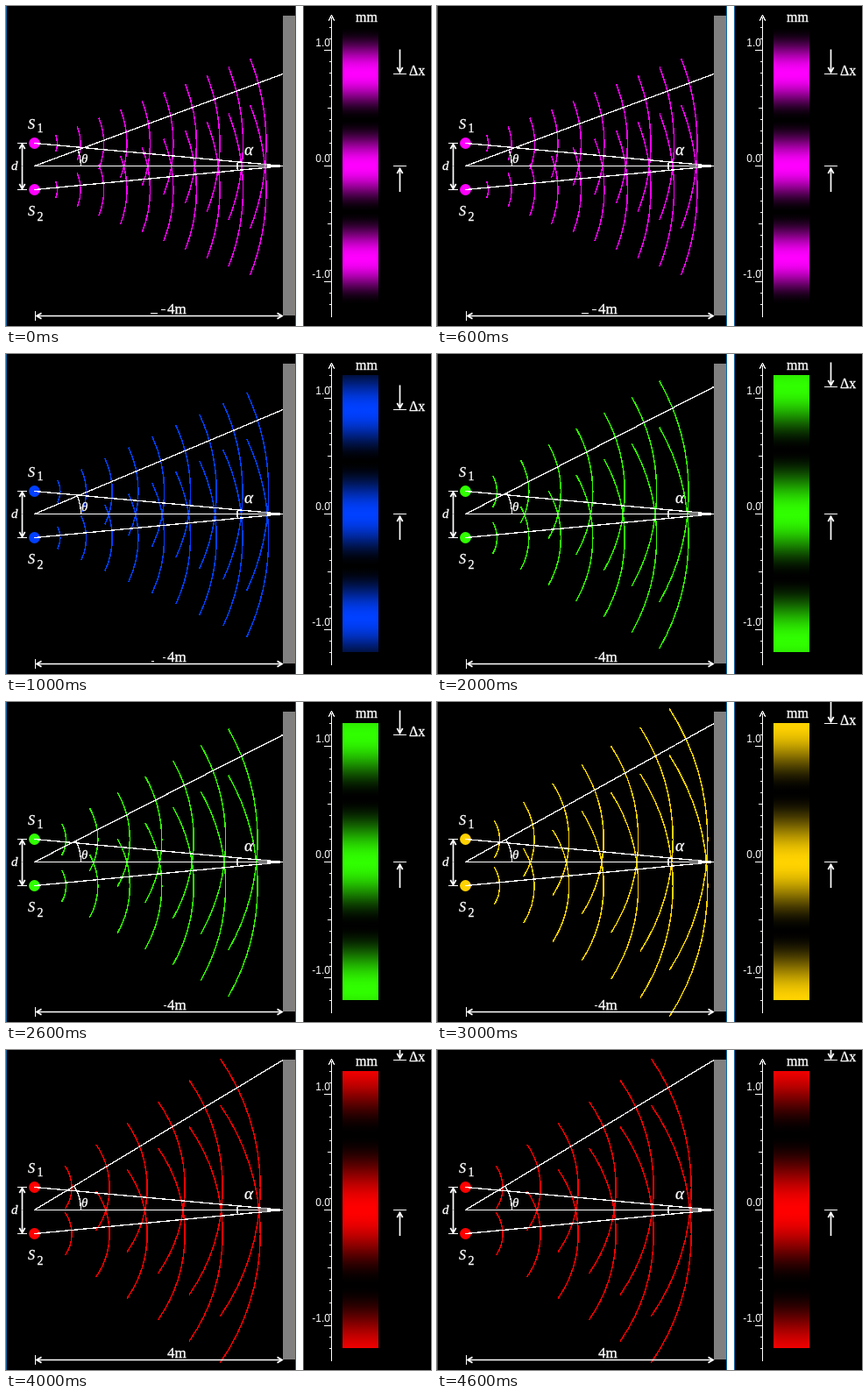
Recreate the animation shown at these times as an HTML page. Size 485x365 px, loop 5000 ms.

```html
<!DOCTYPE html>
<html lang="en">
<head>
<meta charset="utf-8">
<title>Two-slit interference by colour</title>
<style>
  html, body { margin: 0; width: 100%; height: 100%; overflow: hidden; background: #000; }
  svg { display: block; width: 485px; height: 365px; }
  line, path { fill: none; stroke: #fff; stroke-width: 1.35; shape-rendering: crispEdges; }
  text { fill: #fff; stroke: #fff; stroke-width: .3; font: 16px "Liberation Serif", "Noto Serif", serif; }
  .it { font-style: italic; }
  .num { font: 12px "Liberation Sans", Inter, sans-serif; text-anchor: end; stroke: none; }
  .frame line { stroke: #0b6aa8; stroke-width: 1; }
  .waves path { stroke: var(--hue); stroke-width: 1.5; }
  .dot { fill: var(--hue); }
  .arrow line, .arrow path { stroke-width: 1.7; shape-rendering: auto; }
  .scene { visibility: hidden; animation: show 5s step-end infinite; }
  @keyframes show {
    0% { visibility: visible; }
    20%, 100% { visibility: hidden; }
  }
</style>
</head>
<body>
<svg viewBox="0 0 485 365">
  <defs id="defs"></defs>
  <rect width="485" height="365" fill="#000"/>
  <g class="frame">
    <rect x="331" width="8" height="365" fill="#fff"/>
    <line x1="0.5" y1="0" x2="0.5" y2="365"/>
    <line x1="330.5" y1="0" x2="330.5" y2="365"/>
    <line x1="339.5" y1="0" x2="339.5" y2="365"/>
  </g>
  <g id="scenes"></g>
  <g id="fixed">
    <rect x="316" y="11" width="14" height="342" fill="#808080"/>
    <text class="it" x="25" y="140">S<tspan x="35.5" y="143.5" font-size="14" font-style="normal">1</tspan></text>
    <text class="it" x="25" y="239">S<tspan x="35.5" y="245" font-size="14" font-style="normal">2</tspan></text>
    <text class="it" x="6" y="187" style="font-size:15px">d</text>
    <text class="it" x="86" y="179" style="font-size:15px">θ</text>
    <text class="it" x="272" y="170" style="font-size:19px">α</text>
    <text x="184" y="351" style="font-size:17px">4m</text>
    <text x="399" y="18">mm</text>
  </g>
</svg>
<script>
const NS = "http://www.w3.org/2000/svg";
const byId = id => document.getElementById(id);
const MID = 182.5, LEFT = 32.5, WALL = 316, SLITS = [156.5, 209.5];
const BAND = { x: 384, top: 24, height: 316 };

function add(parent, tag, attrs = {}, text = "") {
  const el = document.createElementNS(NS, tag);
  for (const key in attrs) el.setAttribute(key, attrs[key]);
  el.textContent = text;
  parent.append(el);
  return el;
}

const line = (g, x1, y1, x2, y2) => add(g, "line", { x1, y1, x2, y2 });

// Open arrowhead with its tip at x, y, pointing along angle (degrees).
const head = (g, x, y, angle, size = 5.5) => add(g, "path", {
  d: `M${-size} -3.2L0 0L${-size} 3.2`,
  transform: `translate(${x} ${y}) rotate(${angle})`
});

function arrow(parent, x1, y1, x2, y2) {
  const g = add(parent, "g", { class: "arrow" });
  line(g, x1, y1, x2, y2);
  head(g, x2, y2, Math.atan2(y2 - y1, x2 - x1) * 180 / Math.PI);
}

function arc(g, cx, cy, r, from, to) {
  const at = a => `${cx + r * Math.cos(a)} ${cy + r * Math.sin(a)}`;
  return add(g, "path", { d: `M${at(from)}A${r} ${r} 0 0 1 ${at(to)}` });
}

// spread: half angle of the wave arcs; shift: fringe spacing in pixels.
const colours = [
  { hue: "#ff00ff", rgb: [255, 0, 255], step: 26.5, count: 10, spread: 21.5, shift: 105.5, dashes: [[165, 173, 350], [177, 182, 346]] },
  { hue: "#0040ff", rgb: [0, 64, 255], step: 29.75, count: 9, spread: 25, shift: 118.8, dashes: [[166, 169, 350], [179, 182, 346]] },
  { hue: "#30ff00", rgb: [48, 255, 0], step: 36.45, count: 7, spread: 29.6, shift: 145, dashes: [[180, 183, 346]] },
  { hue: "#ffd200", rgb: [255, 210, 0], step: 39.55, count: 7, spread: 32.6, shift: 158.5, dashes: [[180, 183, 346]] },
  { hue: "#ff0000", rgb: [255, 0, 0], step: 43.05, count: 6, spread: 34.7, shift: 171.5, dashes: [] }
];

function fringes(g, c, id) {
  const grad = add(byId("defs"), "linearGradient", {
    id, gradientUnits: "userSpaceOnUse",
    x1: 0, x2: 0, y1: BAND.top, y2: BAND.top + BAND.height
  });
  const n = 79;
  for (let k = 0; k <= n; k++) {
    const y = BAND.top + BAND.height * k / n;
    const level = Math.cos(Math.PI * (y - MID) / c.shift) ** 2;
    add(grad, "stop", {
      offset: k / n,
      "stop-color": `rgb(${c.rgb.map(v => Math.round(v * level))})`
    });
  }
  add(g, "rect", { x: BAND.x, y: BAND.top, width: 41, height: BAND.height, fill: `url(#${id})` });
}

function scene(c, i) {
  const g = add(byId("scenes"), "g", {
    class: "scene", style: `--hue:${c.hue};animation-delay:${i - 5}s`
  });
  const waves = add(g, "g", { class: "waves" });
  const half = c.spread * Math.PI / 180;
  for (const y of SLITS) {
    for (let k = 1; k <= c.count; k++) arc(waves, LEFT - 0.5, y + 0.3, c.step * k, -half, half);
    add(g, "circle", { class: "dot", cx: LEFT, cy: y, r: 6.4 });
  }

  const top = Math.floor(MID - c.shift) + 0.5;
  line(g, LEFT, MID, WALL, top);
  arc(g, LEFT, MID, 53, -Math.atan2(c.shift, WALL - LEFT), 0);

  fringes(g, c, `band${i}`);
  line(g, 442, top, 457, top);
  arrow(g, 449.5, top - 28, 449.5, top - 2);
  add(g, "text", { x: 460, y: top + 1.5 }, "Δx");
  for (const [a, b, y] of c.dashes) line(g, a, y + 0.5, b, y + 0.5);
}

function fixedParts(g) {
  line(g, LEFT, MID, WALL, MID);
  for (const y of SLITS) {
    line(g, LEFT, y, WALL, MID);
    line(g, 13, y, 24, y);
  }
  const tilt = Math.atan2(26.5, WALL - LEFT);
  arc(g, WALL, MID, 52, Math.PI - tilt, Math.PI + tilt);

  // Slit distance
  arrow(g, 18.5, MID, 18.5, 157.5);
  arrow(g, 18.5, MID, 18.5, 208.5);

  // Distance to the wall
  line(g, 33.5, 348, 33.5, 359);
  arrow(g, 175, 353.5, 35, 353.5);
  arrow(g, 175, 353.5, 315, 353.5);

  // Scale in tenths of a millimetre
  line(g, 371.5, 13, 371.5, 355);
  head(g, 371.5, 11, -90);
  for (let k = -12; k <= 12; k++) {
    const y = Math.floor(MID - k * 13.2) + 0.5;
    const len = k % 10 === 0 ? 8 : k % 5 === 0 ? 4 : 2;
    line(g, 371 - len, y, 371, y);
    if (k % 10 === 0) add(g, "text", { class: "num", x: 370, y: y - 5 }, (k / 10).toFixed(1));
  }

  // Lower end of the fringe spacing
  line(g, 442, MID, 457, MID);
  arrow(g, 449.5, 212, 449.5, 185.5);
}

colours.forEach(scene);
fixedParts(byId("fixed"));
</script>
</body>
</html>
```
